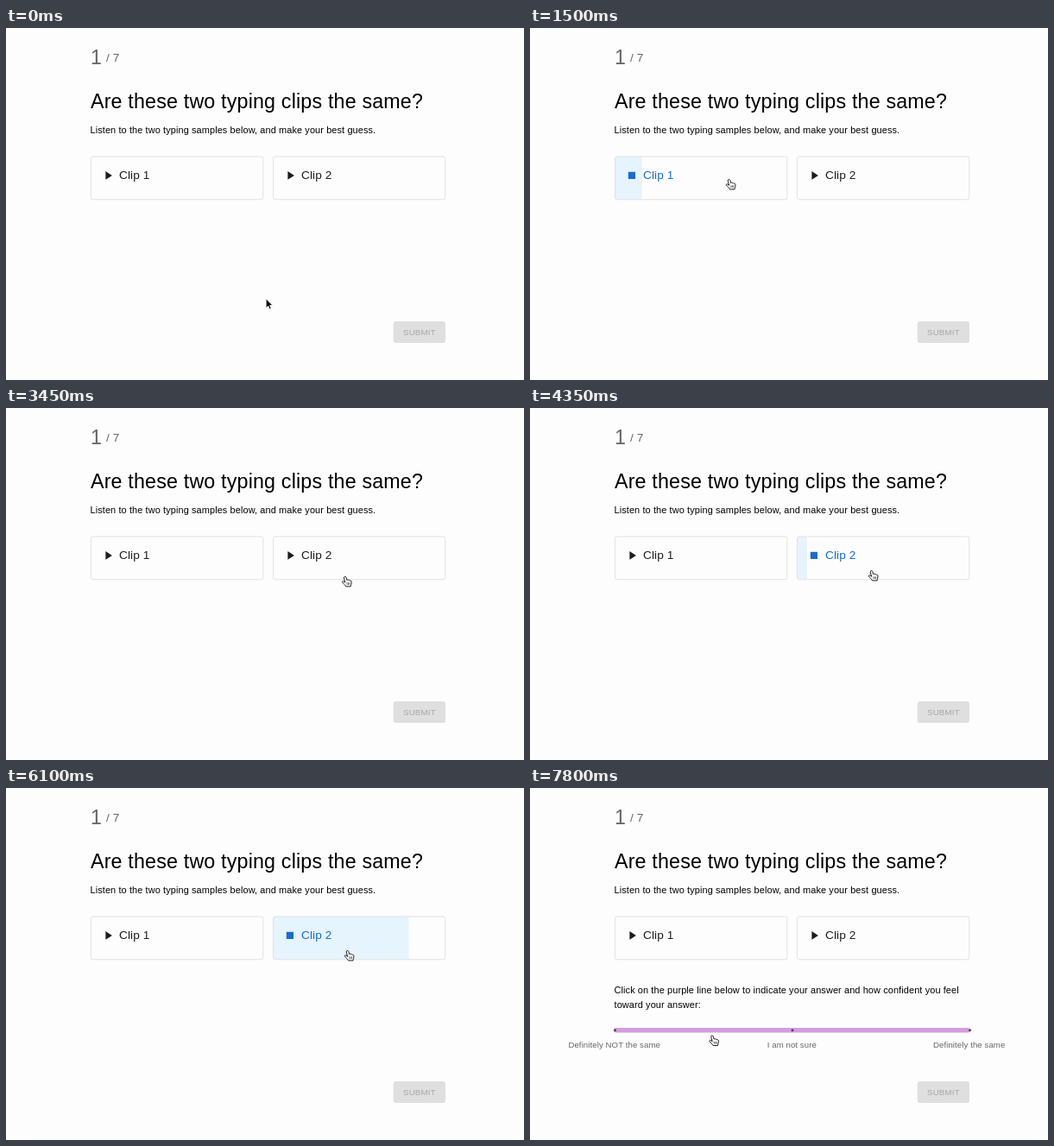
Recreate the animation shown at these times as an HTML page. Size 600x408 px, loop 8 s.

```html
<!DOCTYPE html>
<html lang="en">
<head>
<meta charset="utf-8">
<title>Typing clips</title>
<style>
  html, body { margin: 0; width: 100%; height: 100%; overflow: hidden; background: #fefdfe; }
  svg { display: block; width: 100%; height: 100%; }
  text { font-family: "Liberation Sans", Arial, sans-serif; white-space: pre; }
  .title { font-size: 23.27px; letter-spacing: .00735em; }
  .body { font-size: 10.95px; letter-spacing: .00938em; }
  .label { font-size: 13.68px; letter-spacing: .0075em; }
  .small { font-size: 9.58px; letter-spacing: .01071em; text-anchor: middle; }
  .button { font-size: 9.58px; letter-spacing: .02857em; fill: #a6a6a8; }
  .grey { fill: #666; }
  .frame { fill: none; stroke: #e0e0e5; }
  .fill { fill: #e5f4fd; }
  .clip { fill: #1c1c1c; }
  .clip .stop { display: none; }
  .clip.on { fill: #1a6cce; }
  .clip.on .stop { display: inline; }
  .clip.on .play { display: none; }
</style>
</head>
<body>
<svg viewBox="0 0 600 408">
  <text class="title grey" x="98" y="42">1</text>
  <text class="label grey" x="116" y="38.5">/ 7</text>
  <text class="title" x="98" y="92.7">Are these two typing clips the same?</text>
  <text class="body" x="97.5" y="122">Listen to the two typing samples below, and make your best guess.</text>

  <g id="cards"></g>

  <g id="question">
    <text class="body" x="97.5" y="238.3">Click on the purple line below to indicate your answer and how confident you feel</text>
    <text class="body" x="97.5" y="254.7">toward your answer:</text>
    <rect x="97" y="278" width="413" height="5.4" rx="2.7" fill="#d29edc"/>
    <g fill="#66306f">
      <circle cx="98.5" cy="280.7" r="1.5"/>
      <circle cx="304" cy="280.7" r="1.5"/>
      <circle cx="509.5" cy="280.7" r="1.5"/>
    </g>
    <text class="small grey" x="97.7" y="301.3">Definitely NOT the same</text>
    <text class="small grey" x="303.3" y="301.3">I am not sure</text>
    <text class="small grey" x="508.7" y="301.3">Definitely the same</text>
  </g>

  <rect x="448.7" y="340" width="60.3" height="25" rx="2.7" fill="#dfdfe0"/>
  <text class="button" x="460" y="356">SUBMIT</text>

  <g id="cursor">
    <circle id="ring" r="20.5" fill="none" stroke="#333" stroke-width="1.4"/>
    <path id="arrow" d="M0 0V10.8L2.5 8.5 4.1 12.3 6 11.5 4.4 7.8H7.7Z" fill="#000" stroke="#fff" stroke-width=".8"/>
    <g id="hand" fill="#fff" stroke="#111" stroke-width=".95" stroke-linejoin="round" stroke-linecap="round">
      <path d="M-1.3 1.2C-1.4-.4.9-.6 1.3 1L2.1 4.1C2.8 3.4 4 3.6 4.2 4.4 4.9 3.8 5.8 4.2 6 5 6.8 4.6 7.4 5.2 7.4 6 7.6 8.5 6.7 9.3 6.5 11.5H1C.6 10-1.8 8.6-3 6.6-3.6 5.6-2.4 4.9-1.4 5.7L-.2 6.6Z"/>
      <path d="M2.3 7.3V9.3M3.8 7.3V9.3M5.2 7.3V9.3" fill="none" stroke-width=".6"/>
    </g>
  </g>
</svg>
<script>
const LOOP = 8000, STEP = 50, RAMP = 180, CARD_W = 200;
const $ = id => document.getElementById(id);

// on/off: playing state; from: bar start; speed: px per ms
const clips = [
  { x: 98, name: "Clip 1", on: 950, off: 3150, from: 1090, speed: .0968 },
  { x: 309, name: "Clip 2", on: 4000, off: 6450, from: 4122, speed: .0832 }
];
const clicks = [[750, 950], [3800, 4000]];
const asked = 6450, fade = 200;

// Each move bends from the previous point through "via" to "to"
const home = [301.2, 313.8];
const moves = [
  { start: 0, end: 500, via: [415, 260], to: [230.5, 175.5] },
  { start: 3050, end: 3512, via: [370, 262], to: [395.5, 188.5] },
  { start: 6850, end: 7350, via: [390, 250], to: [326, 287] },
  { start: 7550, end: 7800, via: [268, 287], to: [211, 287] }
];

$("cards").innerHTML = clips.map(c => `
  <g class="clip" transform="translate(${c.x} 0)">
    <rect class="fill" x=".5" y="149.2" width="0" height="49.4" rx="1.5"/>
    <rect class="frame" x=".4" y="149" width="199.4" height="49.8" rx="2.5"/>
    <path class="play" d="M17.4 166.1V175.7L24.9 170.9Z"/>
    <rect class="stop" x="15.8" y="166.8" width="8.2" height="8.2"/>
    <text class="label" x="33" y="175.4">${c.name}</text>
  </g>`).join("");
const cards = [...document.querySelectorAll(".clip")];

const clamp = v => Math.min(1, Math.max(0, v));
const smooth = u => u * u * (3 - 2 * u);
const within = (v, a, b) => v >= a && v < b;
const show = (id, on) => $(id).setAttribute("visibility", on ? "visible" : "hidden");

function barWidth(c, t) {
  const u = Math.max(0, t - c.from);
  const w = c.speed * (u < RAMP ? u * u / (2 * RAMP) : u - RAMP / 2);
  return Math.min(CARD_W - 1, w);
}

function cursorAt(t) {
  let p = home;
  for (const m of moves) {
    if (t < m.start) break;
    const k = smooth(clamp((t - m.start) / (m.end - m.start))), j = 1 - k;
    p = p.map((a, i) => j * j * a + 2 * j * k * m.via[i] + k * k * m.to[i]);
  }
  return p;
}

function draw(t) {
  clips.forEach((c, i) => {
    const on = within(t, c.on, c.off);
    cards[i].classList.toggle("on", on);
    cards[i].querySelector(".fill").setAttribute("width", on ? barWidth(c, t) : 0);
  });
  $("question").setAttribute("opacity", smooth(clamp((t - asked + STEP) / fade)));

  const [x, y] = cursorAt(t);
  const overCard = within(y, 149, 199) && clips.some(c => within(x, c.x, c.x + CARD_W));
  const overLine = t >= asked && within(y, 272, 290) && within(x, 98, 509);
  const hand = overCard || overLine;
  $("cursor").setAttribute("transform", `translate(${x} ${y})`);
  show("hand", hand);
  show("arrow", !hand);
  show("ring", clicks.some(([a, b]) => within(t, a, b)));
}

const began = performance.now();
function tick() {
  const t = (performance.now() - began) % LOOP;
  draw(Math.floor(t / STEP) * STEP);
  requestAnimationFrame(tick);
}
draw(0);
requestAnimationFrame(tick);
</script>
</body>
</html>
```
